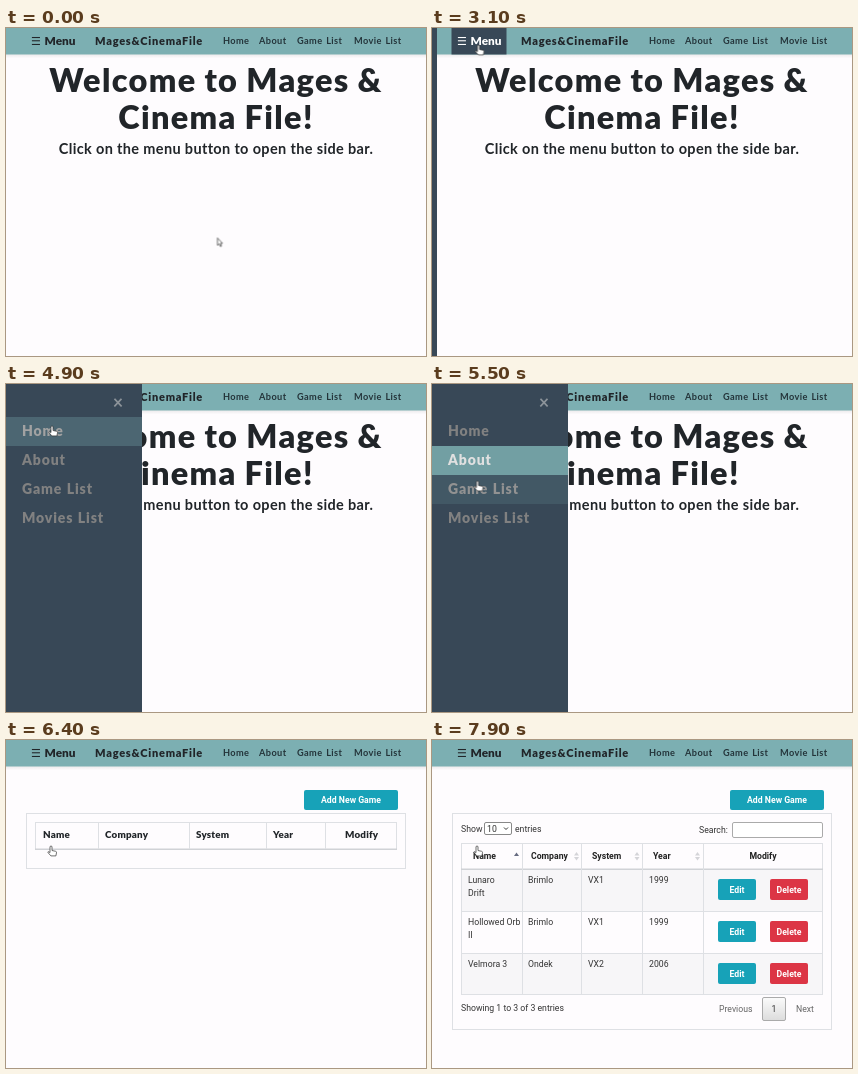
Animation, 420 px wide and 328 px high, one loop 8000 ms. Source, as an HTML page:

```html
<!DOCTYPE html>
<html lang="en">
<head>
<meta charset="utf-8">
<title>Menu demo</title>
<style>
  html, body { margin: 0; width: 100%; height: 100%; overflow: hidden; background: #fefcfe; }
  #stage { position: relative; width: 420px; height: 328px; overflow: hidden; }
  svg { position: absolute; left: 0; top: 0; width: 420px; height: 328px; }
  text { white-space: pre; }
  .show { font-family: Lato, sans-serif; font-weight: 900; fill: #212529; }
  .title { font-size: 32.5px; letter-spacing: 1.3px; word-spacing: -.8px; text-anchor: middle; }
  .sub { font-size: 14.5px; font-weight: 700; letter-spacing: .35px; word-spacing: 0; text-anchor: middle; }
  .menu { font-size: 11.8px; }
  .brand { font-size: 11px; letter-spacing: .75px; }
  .link { font-size: 9.2px; font-weight: 700; letter-spacing: .4px; word-spacing: 1px; fill: #24343a; }
  .head { font-size: 9.8px; letter-spacing: .2px; }
  .ui { font: 8.7px Roboto, sans-serif; fill: #333; }
  .bold { font-weight: 700; fill: #222; }
  .btn { font-weight: 700; fill: #fff; }
  .mid { text-anchor: middle; }
  .soft { fill: #666; }
  #side { position: absolute; left: 0; top: 0; width: 0; height: 328px; overflow: hidden; background: #384857; }
  #side div { position: absolute; left: 0; width: 100%; height: 27px; padding-bottom: 2px; line-height: 27px;
    text-indent: 16px; white-space: nowrap; color: #818181;
    font-family: Lato, sans-serif; font-size: 14px; font-weight: 900; letter-spacing: .85px; word-spacing: .5px; }
  #close { position: absolute; right: 18px; top: 7px; width: 12px; height: 22px; line-height: 22px;
    text-align: center; color: #8d949a; font-family: Lato, sans-serif; font-size: 18px; font-weight: 700; }
</style>
</head>
<body>
<div id="stage">
  <svg id="page"></svg>
  <div id="side"><span id="close">×</span></div>
  <svg id="pointer">
    <g id="cursor" stroke="#333" stroke-width=".7" stroke-linejoin="round" fill="#fff">
      <path id="arrow" d="M0-.5v7.4l1.7-1.5 1.2 2.6 1.2-.5-1.2-2.6h2.2z"/>
      <path id="hand" d="M0 0q1 0 1 1v3.5l3.6.8q1.1.3.9 1.4l-.6 3.2h-5l-2.9-3.3q-.4-1.2.9-.8l1.1.8V1q0-1 1-1z"/>
    </g>
  </svg>
</div>
<script>
const LOOP = 8000, STEP = 100;
const TEAL = '#7cafb2', SLATE = '#384857', CYAN = '#17a2b8', RED = '#dc3545', LINE = '#dee0e4';
const $ = id => document.getElementById(id);

const text = (x, y, s, cls) => `<text x="${x}" y="${y}" class="${cls}">${s.replace('&', '&amp;')}</text>`;
const rect = (x, y, w, h, fill, extra = '') =>
  `<rect x="${x}" y="${y}" width="${w}" height="${h}" fill="${fill}" ${extra}/>`;
const frame = (x, y, w, h, stroke, extra = '', fill = 'none') =>
  rect(x + .5, y + .5, w - 1, h - 1, fill, `stroke="${stroke}" ${extra}`);
const button = (x, y, w, h, fill, label) =>
  rect(x, y, w, h, fill, 'rx="2"') + text(x + w / 2, y + h / 2 + 3.1, label, 'ui btn mid');
const group = (id, body) => `<g id="${id}">${body}</g>`;
const vline = (x, y1, y2) => rect(x, y1, 1, y2 - y1, LINE);
const burger = fill =>
  `<text x="25" y="16.5" font-family="DejaVu Sans, sans-serif" font-size="11" fill="${fill}">☰</text>` +
  `<text x="38.5" y="16.5" class="show menu" style="fill:${fill}">Menu</text>`;

const nav = rect(0, 0, 420, 26.5, TEAL) + rect(0, 26.5, 420, 4, 'url(#shade)') +
  burger('#212529') + text(89, 16.5, 'Mages&CinemaFile', 'show brand') +
  [[217, 'Home'], [253, 'About'], [291, 'Game List'], [348, 'Movie List']]
    .map(([x, s]) => text(x, 16, s, 'show link')).join('');

const home = text(210, 64, 'Welcome to Mages &', 'show title') +
  text(210, 101, 'Cinema File!', 'show title') +
  text(210, 126, 'Click on the menu button to open the side bar.', 'show sub');

const bare = frame(20, 73, 380, 56, LINE) + frame(29, 82, 362, 28, LINE) +
  rect(29, 108.5, 362, 1.5, '#d0d2d6') +
  [92, 183, 260, 319].map(x => vline(x, 82, 109)).join('') +
  [[37, 'Name'], [99, 'Company'], [190, 'System'], [267, 'Year'], [339, 'Modify']]
    .map(([x, s]) => text(x, 98, s, 'show head')).join('');

const sorter = (x, y, up, down) =>
  `<path d="M${x - 2.5} ${y}l2.5-3.5 2.5 3.5z" fill="${up}"/>` +
  `<path d="M${x - 2.5} ${y + 1.5}l2.5 3.5 2.5-3.5z" fill="${down}"/>`;

const games = [
  [['Lunaro', 'Drift'], 'Brimlo', 'VX1', '1999'],
  [['Hollowed Orb', 'II'], 'Brimlo', 'VX1', '1999'],
  [['Velmora 3'], 'Ondek', 'VX2', '2006']
];
const row = ([name, maker, system, year], i) => {
  const y = 129 + i * 42;
  return rect(29, y, 362, 42, i % 2 ? '#fefcfe' : '#f7f6f8') + rect(29, y, 362, 1, LINE) +
    name.map((s, k) => text(36, y + 14 + k * 13, s, 'ui')).join('') +
    text(96, y + 14, maker, 'ui') + text(156, y + 14, system, 'ui') + text(217, y + 14, year, 'ui') +
    button(286, y + 10, 38, 21, CYAN, 'Edit') + button(338, y + 10, 38, 21, RED, 'Delete');
};

const full = frame(20, 73, 380, 217, LINE) +
  text(29, 92, 'Show', 'ui') + frame(52, 82, 28, 13, '#888', 'rx="1.5"', '#fff') +
  text(55, 92, '10', 'ui') + '<path d="M72 87.5l2 2 2-2" fill="none" stroke="#333"/>' +
  text(83, 92, 'entries', 'ui') + text(267, 93, 'Search:', 'ui') +
  frame(300, 82, 91, 16, '#aaa', 'rx="1.5"', '#fff') +
  games.map(row).join('') + frame(29, 103, 362, 152, LINE) + rect(29, 128.5, 362, 1.5, '#d0d2d6') +
  [90, 149, 210, 271].map(x => vline(x, 103, 254)).join('') +
  [[41, 'Name'], [99, 'Company'], [160, 'System'], [221, 'Year']]
    .map(([x, s]) => text(x, 119, s, 'ui bold')).join('') + text(331, 119, 'Modify', 'ui bold mid') +
  sorter(84.5, 116, '#666b80', 'none') + [144.5, 205, 265.5].map(x => sorter(x, 115.5, '#d4d4d8', '#d4d4d8')).join('') +
  text(29, 271, 'Showing 1 to 3 of 3 entries', 'ui') +
  text(287, 271.5, 'Previous', 'ui soft') + text(364, 271.5, 'Next', 'ui soft') +
  frame(330, 257, 24, 24, '#aaa', 'rx="1.5"', 'url(#grey)') + text(342, 271.5, '1', 'ui mid');

const fade = (id, stops) => `<linearGradient id="${id}" x2="0" y2="1">${stops}</linearGradient>`;

$('page').innerHTML =
  fade('grey', '<stop stop-color="#fbfbfb"/><stop offset="1" stop-color="#dcdcdc"/>') +
  fade('shade', '<stop stop-opacity=".07"/><stop offset="1" stop-opacity="0"/>') +
  nav + group('hover', rect(19.5, 0, 55, 26.5, SLATE) + burger('#fff')) + group('home', home) +
  group('add', button(298, 50, 94, 20, CYAN, 'Add New Game')) + group('bare', bare) + group('full', full);

const items = ['Home', 'About', 'Game List', 'Movies List'].map((s, i) => {
  const el = document.createElement('div');
  el.textContent = s;
  el.style.top = 32.5 + i * 29 + 'px';
  $('side').append(el);
  return el;
});

// Each track is a list of [ms, properties, easing to the next step].
const anims = [];
function track(el, steps) {
  const last = steps[steps.length - 1];
  const rows = [[0, steps[0][1]], ...steps, [LOOP, last[1]]];
  const frames = rows.map(([ms, props, easing = 'linear']) => ({ ...props, offset: ms / LOOP, easing }));
  const anim = el.animate(frames, { duration: LOOP, iterations: Infinity });
  anim.pause();
  anims.push(anim);
}
const during = (id, ...spans) => track($(id), [
  [0, { opacity: 0 }, 'step-end'],
  ...spans.flatMap(([a, b]) => [[a, { opacity: 1 }, 'step-end'], [b, { opacity: 0 }, 'step-end']])
]);

during('home', [0, 6400]);
during('hover', [700, 3200]);
during('add', [6400, LOOP]);
during('bare', [6400, 6600]);
during('full', [6600, LOOP]);
during('arrow', [0, 700], [3200, 4830]);
during('hand', [700, 3200], [4830, LOOP]);

track($('side'), [
  [3074, { width: '0px' }, 'ease'],
  [3574, { width: '136px' }],
  [6400, { width: '136px' }, 'step-end'],
  [6400, { width: '0px' }]
]);

const idle = { backgroundColor: 'rgba(124,175,178,0)', color: '#818181' };
const lit = { backgroundColor: 'rgba(124,175,178,1)', color: '#f1f1f1' };
[[4840, 5150], [5150, 5460], [5460, 6400]].forEach(([on, off], i) => track(items[i], [
  [on, idle, 'ease'], [on + 300, lit], [off, lit, 'ease'], [off + 300, idle]
]));

const at = (x, y) => ({ transform: `translate(${x}px, ${y}px)` });
track($('cursor'), [
  [100, at(211.5, 210.5), 'ease-in-out'],
  [750, at(46.5, 17)],
  [4400, at(46.5, 17)],
  [4830, at(46, 33)],
  [4900, at(46, 42)],
  [5150, at(46, 62)],
  [5460, at(45.5, 91)],
  [5500, at(45.5, 97)],
  [5700, at(45, 106)]
]);

const start = performance.now();
function draw() {
  const t = (performance.now() - start) % LOOP;
  const now = Math.floor(t / STEP) * STEP;
  for (const a of anims) a.currentTime = now;
  requestAnimationFrame(draw);
}
draw();
</script>
</body>
</html>
```
